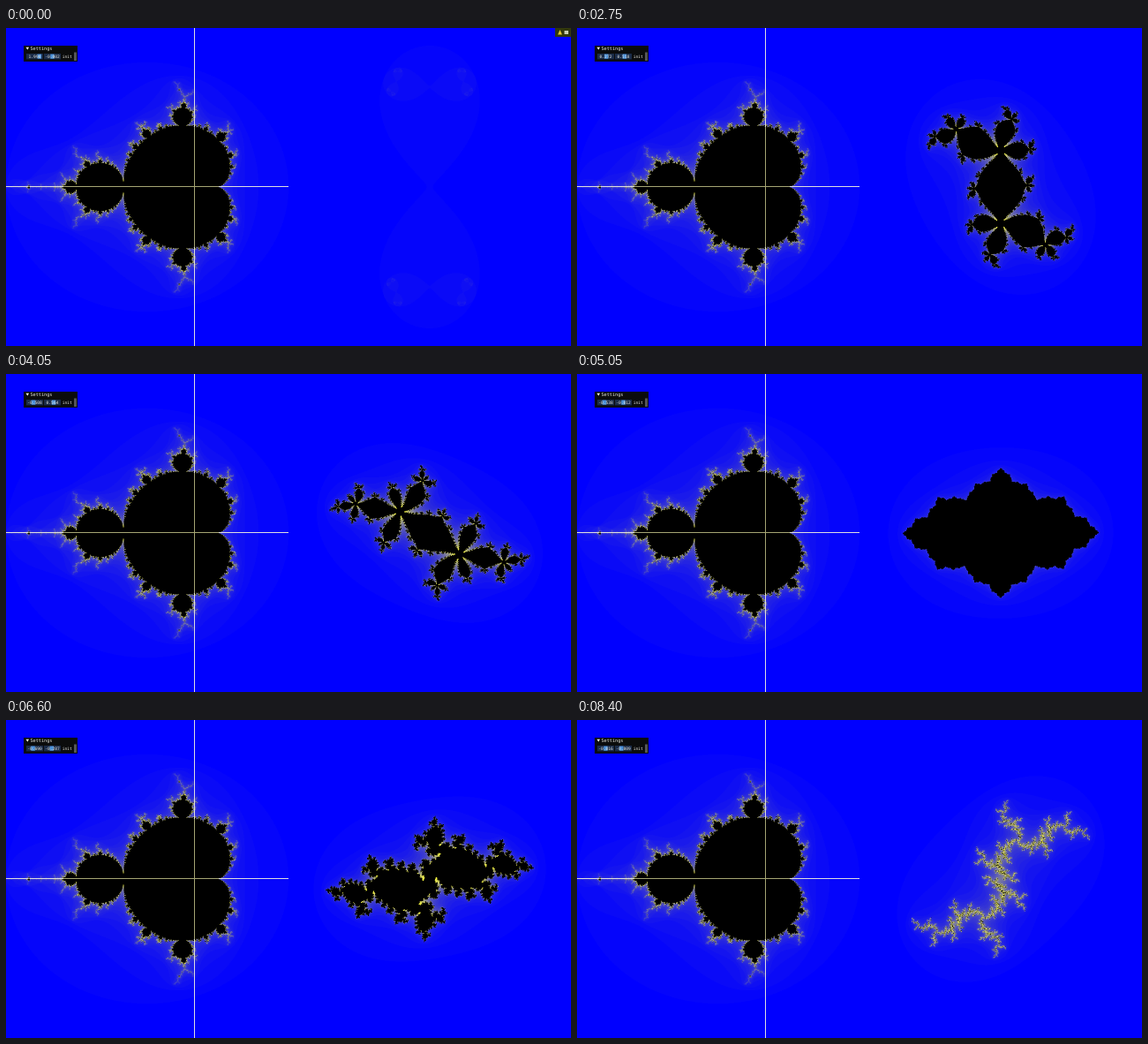
An HTML page with a canvas that plays this animation: 640 px wide and 360 px high, repeating every 8.45 s.

```html
<!DOCTYPE html>
<html lang="en">
<head>
<meta charset="utf-8">
<title>Julia set explorer</title>
<style>
  html, body { margin: 0; width: 100%; height: 100%; overflow: hidden; background: #00f; }
  canvas, svg { position: absolute; left: 0; top: 0; width: 640px; height: 360px; }
  text { font: 4.6px "DejaVu Sans Mono", "Liberation Mono", monospace; fill: #e8e8e0; }
  .title { font-size: 5.2px; }
  .grab { fill: #4a90d8; }
</style>
</head>
<body>
<canvas id="stage" width="640" height="360"></canvas>
<svg viewBox="0 0 640 360">
  <g id="panel">
    <rect x="20" y="20" width="61" height="18" fill="#0b0c0c"/>
    <path d="M22.5 21.8h3.6l-1.8 3z" fill="#f4f4e0"/>
    <text class="title" x="27.5" y="25.2">Settings</text>
    <rect x="23" y="29" width="19" height="6.4" fill="#1b2c48"/>
    <rect x="43" y="29" width="19" height="6.4" fill="#1b2c48"/>
    <rect class="grab" y="29.6" width="4.4" height="5.2"/>
    <rect class="grab" y="29.6" width="4.4" height="5.2"/>
    <text class="value" x="32.5" y="34" text-anchor="middle"></text>
    <text class="value" x="52.5" y="34" text-anchor="middle"></text>
    <text x="63.7" y="34">init</text>
    <rect x="77" y="27.5" width="3" height="9.5" fill="#555"/>
  </g>
  <g id="badge">
    <rect x="622" y="0" width="18" height="10" fill="#32380c"/>
    <path d="M627.5 2l2.4 5.5h-4.8z" fill="#e8c832"/>
    <rect x="632.5" y="3" width="4.5" height="4" fill="#c8ccb0"/>
  </g>
</svg>
<script>
const LOOP = 8450, STEP = 50, MAX_ITER = 50, BADGE_END = 400;
const W = 320, H = 360, AXIS_X = 213, AXIS_Y = 179;

// time in ms, real part, imaginary part
const PATH = [
  [0, 1.998, -0.002],
  [1700, 0.331, 0.022],
  [2750, 0.272, 0.518],
  [4050, -0.508, 0.564],
  [5050, -0.538, -0.012],
  [5600, -0.3, -0.3],
  [6600, -0.69, -0.287],
  [8400, -0.016, -0.809]
];

const ctx = document.getElementById("stage").getContext("2d");
const grabs = document.querySelectorAll(".grab");
const values = document.querySelectorAll(".value");
const badge = document.getElementById("badge");

function escapeTime(x, y, cx, cy) {
  for (let i = 0; i < MAX_ITER; i++) {
    const xx = x * x - y * y + cx;
    y = 2 * x * y + cy;
    x = xx;
    if (x * x + y * y > 4) return i;
  }
  return MAX_ITER;
}

// Mean of 2 x 2 samples: warm is the red and green part, cool the blue part.
function shade(px, py, sample) {
  let warm = 0, cool = 0;
  for (let k = 0; k < 4; k++) {
    const i = sample(px + 0.25 + (k & 1) / 2, py + 0.25 + (k >> 1) / 2);
    if (i < MAX_ITER) {
      warm += i;
      cool += MAX_ITER - 0.8 * i;
    }
  }
  const scale = 255 / MAX_ITER / 4;
  return [warm * scale, cool * scale];
}

function put(data, index, r, g, b) {
  const o = index * 4;
  data[o] = r;
  data[o + 1] = g;
  data[o + 2] = b;
  data[o + 3] = 255;
}

function drawMandelbrot() {
  const image = ctx.createImageData(W, H), unit = W / 3;
  const sample = (x, y) => {
    const cx = x / unit - 2, cy = (H / 2 - y) / unit;
    return escapeTime(cx, cy, cx, cy);
  };
  for (let y = 0; y < H; y++) {
    for (let x = 0; x < W; x++) {
      const [warm, cool] = shade(x, y, sample), n = y * W + x;
      const axis = x === AXIS_X || y === AXIS_Y;
      if (!axis) put(image.data, n, warm, warm, cool);
      else if (warm + cool < 60) put(image.data, n, 165, 165, 115);
      else put(image.data, n, 222, 222, 225);
    }
  }
  ctx.putImageData(image, 0, 0);
}

const juliaImage = ctx.createImageData(W, H);

function drawJulia(cx, cy) {
  const data = juliaImage.data, unit = W / 4, last = W * H - 1;
  const sample = (x, y) => escapeTime(x / unit - 2, (H / 2 - y) / unit, cx, cy);
  // The set is point symmetric, so the upper half gives the lower one.
  for (let y = 0; y < H / 2; y++) {
    for (let x = 0; x < W; x++) {
      const [warm, cool] = shade(x, y, sample), n = y * W + x;
      put(data, n, warm, warm, cool);
      put(data, last - n, warm, warm, cool);
    }
  }
  ctx.putImageData(juliaImage, W, 0);
}

function constantAt(t) {
  let k = 0;
  while (k < PATH.length - 2 && t > PATH[k + 1][0]) k++;
  const a = PATH[k], b = PATH[k + 1];
  const p = Math.min(1, (t - a[0]) / (b[0] - a[0]));
  return [a[1] + (b[1] - a[1]) * p, a[2] + (b[2] - a[2]) * p];
}

let shown = -1;
const start = performance.now();

function render(now) {
  const t = Math.floor((Math.max(0, now - start) % LOOP) / STEP) * STEP;
  if (t !== shown) {
    shown = t;
    const c = constantAt(t);
    drawJulia(c[0], c[1]);
    c.forEach((v, i) => {
      grabs[i].setAttribute("x", 30.3 + i * 20 + v * 2.7);
      values[i].textContent = v.toFixed(3);
    });
    badge.style.display = t < BADGE_END ? "" : "none";
  }
  requestAnimationFrame(render);
}

drawMandelbrot();
render(start);
</script>
</body>
</html>
```
